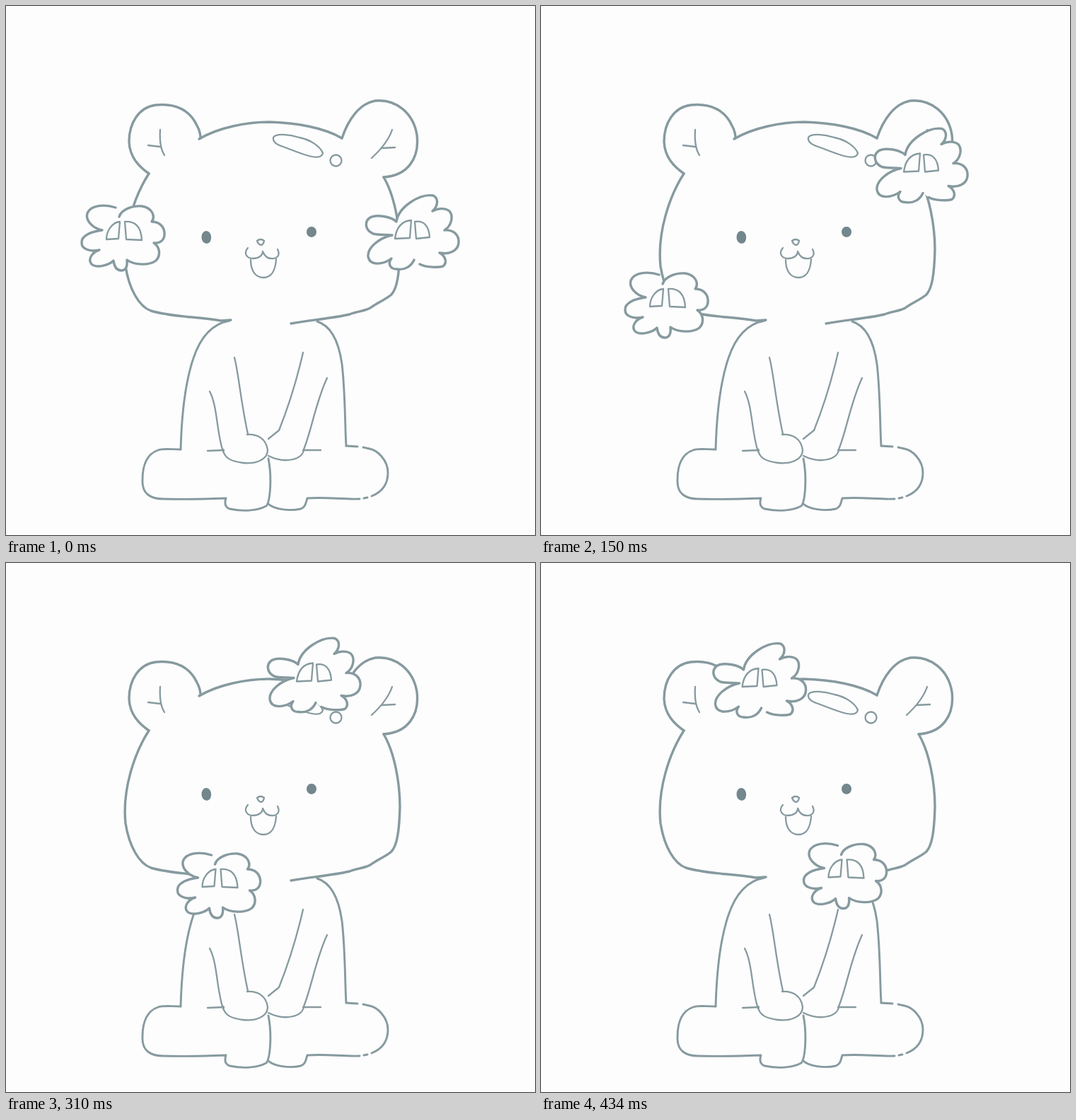
Animation of 748x748 px, one loop 0.49 s. Source, as an HTML page:

```html
<!DOCTYPE html>
<html lang="en">
<head>
<meta charset="utf-8">
<title>Cheering bear</title>
<style>
  html, body { margin: 0; width: 100%; height: 100%; overflow: hidden; background: #fdfdfd; }
  svg { display: block; width: 100%; height: 100%; }
  path, circle { fill: none; stroke: #869a9f; stroke-width: 3.4; stroke-linecap: round; stroke-linejoin: round; }
  .medium path { stroke-width: 2.9; }
  .thin path, .thin circle, .pom .window { stroke-width: 2.3; }
  .pom path { fill: #fdfdfd; }
  .thin .eye { fill: #73878d; stroke: #73878d; stroke-width: 2; }
</style>
</head>
<body>
<svg viewBox="0 0 748 748">
  <g id="head">
    <path d="M202 237C188 227 175 214 174 192C174 165 188 143 212 140C242 137 261 149 270 169Q275 178 275 187"/>
    <path d="M273 188C300 172 340 164 372 164C410 165 450 172 475 187"/>
    <path d="M475 187C484 160 500 138 522 134C552 131 576 152 581 182C585 215 568 240 534 242"/>
    <path d="M202 237C182 268 164 320 169 368C174 400 188 425 205 431C235 440 270 439 304 445L318 444"/>
    <path d="M534 242C549 267 557 310 557 345C556 380 553 399 545 408C537 415 526 419 515 427C506 432 495 432 486 436C460 442 430 444 403 449"/>
  </g>
  <g id="body" class="medium">
    <path d="M316 445C288 450 273 474 265 498C252 536 248 590 247 627"/>
    <path d="M440 446C462 453 471 478 475 506C480 550 479 590 481 622"/>
    <path d="M247 627C232 627 222 625 215 628C198 634 193 650 193 670C192 690 205 697 222 697C255 698 285 697 311 696C309 702 309 708 316 711C335 715 355 714 368 707C374 700 376 665 371 640"/>
    <path d="M371 704C378 711 400 715 417 711C424 708 424 702 426 696C455 694 475 698 500 697M506 696L511 695M517 693C532 687 540 676 540 660C540 642 525 628 514 626L505 624M481 622L497 623"/>
  </g>
  <g id="arms" class="thin">
    <path d="M323 497C329 520 332 560 342 605M288 545C299 565 298 605 307 630"/>
    <path d="M307 627C308 640 320 644 335 646C352 648 370 642 370 628C368 612 356 605 341 606"/>
    <path d="M420 490C412 525 400 565 386 600L371 612M454 526C438 560 432 600 421 627C420 641 395 648 371 636"/>
    <path d="M285 629L308 628M420 628H445"/>
  </g>
  <g id="face" class="thin">
    <path d="M218 175C217 190 219 203 224 211M201 197L218 199"/>
    <path d="M546 175C541 190 530 203 517 215M531 201L550 200"/>
    <path d="M378 186C381 179 402 182 415 186C430 189 444 198 448 208C446 216 435 214 425 211C412 207 403 203 392 199C382 196 377 192 378 186Z"/>
    <circle cx="466.5" cy="218.5" r="8"/>
    <path d="M355 332Q360 328 365 332Q364 338 360 338Q356 336 355 332"/>
    <path d="M342 342C335 350 341 357 349 357C357 357 363 353 363 347C366 355 372 358 379 357C386 355 387 350 384 344"/>
    <path d="M346 359C346 376 354 384 364 384C375 384 381 374 382 358"/>
    <path class="eye" d="M283 319C291 319 291 335 284 335C275 335 276 319 283 319Z"/>
    <path class="eye" d="M432 313C440 313 440 326 432 326C424 326 424 313 432 313Z"/>
  </g>
  <g id="leftPom" class="pom">
    <path d="M160 298C163 288 178 282 192 283C206 285 212 297 206 305C216 305 223 311 224 320C225 330 219 336 209 335C218 341 219 353 212 360C203 367 182 367 171 359C172 367 170 374 163 374C156 374 153 368 152 360C145 367 128 371 121 365C115 358 122 348 132 345C120 348 107 344 107 335C106 325 120 319 136 317C122 314 112 303 115 293C120 281 140 280 155 285"/>
    <path class="window" d="M142 330C142 318 150 306 161 305L159 329ZM168 305C182 304 191 311 192 331L170 330Z"/>
  </g>
  <g id="rightPom" class="pom">
    <path d="M585 365C595 370 611 370 618 368C624 363 622 354 613 349C627 352 639 346 640 335C641 323 632 316 620 317C630 311 633 297 627 290C621 285 610 286 603 290C611 283 612 272 604 268C585 265 555 284 552 305C545 298 524 294 515 299C506 305 508 317 519 322C526 324 536 323 546 324C527 328 511 342 512 354C514 368 533 366 545 357C539 365 544 372 552 372C564 374 573 368 577 359"/>
    <path class="window" d="M550 329C552 313 560 304 573 303L571 328ZM578 305C591 303 598 311 599 327L580 329Z"/>
  </g>
</svg>
<script>
  const LOOP = 490;
  // Each pose holds until its end time, with the offset of both pompoms.
  const poses = [
    { until: 150, left: [0, 0], right: [0, 0] },
    { until: 250, left: [12, 95], right: [-37, -94.5] },
    { until: 350, left: [135.5, 128], right: [-139, -161.5] },
    { until: LOOP, left: [264.5, 114.5], right: [-265.5, -154] }
  ];
  const leftPom = document.getElementById("leftPom");
  const rightPom = document.getElementById("rightPom");
  const start = performance.now();

  function place(pom, offset) {
    pom.setAttribute("transform", `translate(${offset})`);
  }

  function draw() {
    const time = (performance.now() - start) % LOOP;
    const pose = poses.find(p => time < p.until);
    place(leftPom, pose.left);
    place(rightPom, pose.right);
    requestAnimationFrame(draw);
  }
  draw();
</script>
</body>
</html>
```
